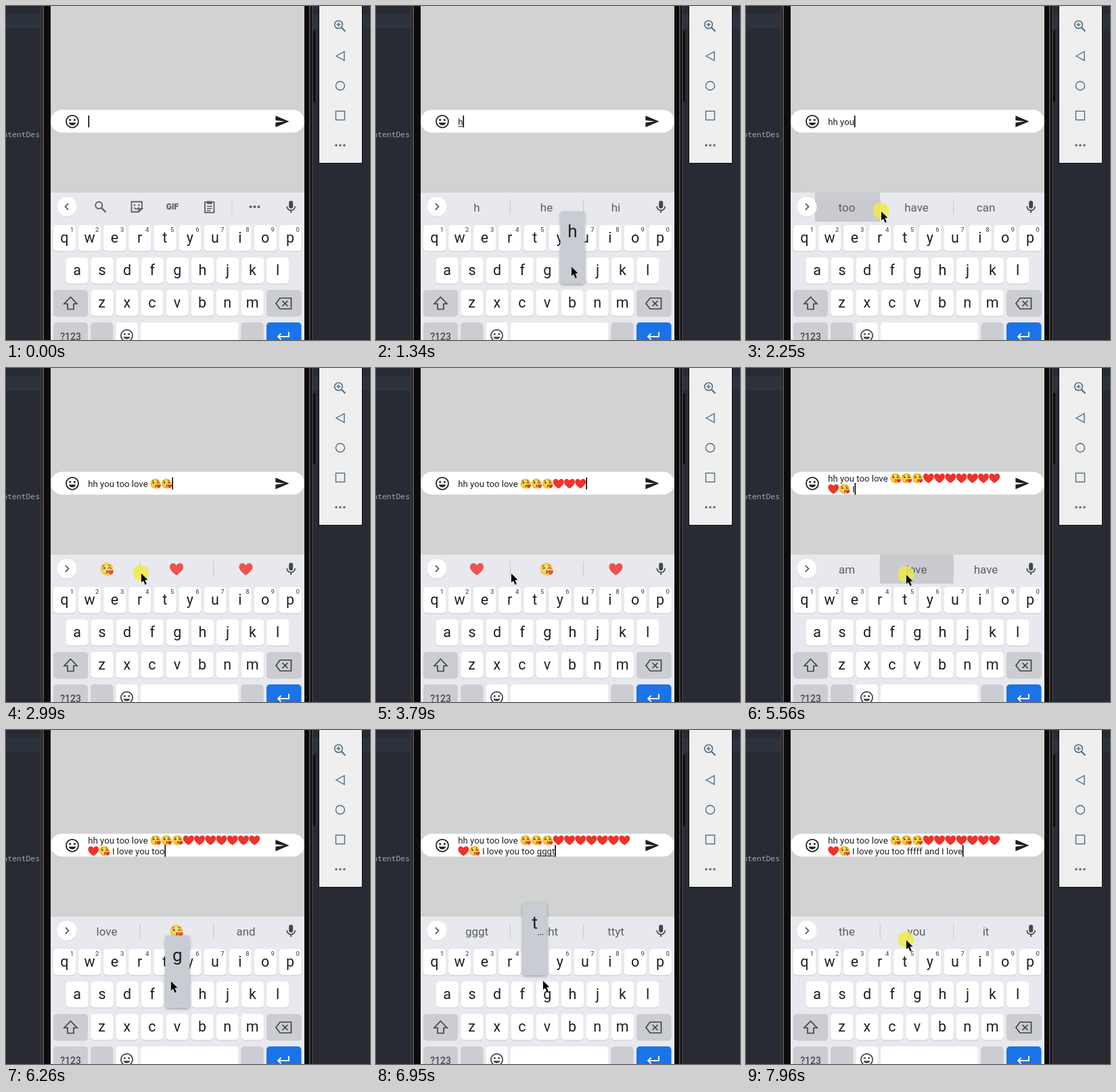
These frames come from a looping animation (538x494 px, 8 s). An HTML page with a canvas:

```html
<!DOCTYPE html>
<html lang="en">
<head>
<meta charset="utf-8">
<title>Emoji keyboard</title>
<style>
html, body { margin: 0; width: 100%; height: 100%; overflow: hidden; background: #282c34; }
canvas { display: block; width: 538px; height: 494px; }
</style>
</head>
<body>
<canvas id="stage" width="538" height="494"></canvas>
<script>
const c = document.getElementById('stage').getContext('2d');
const LOOP = 8000, FONT = 'Roboto, sans-serif';
const INK = '#1f1f1f', GREY = '#5b5e63', KEY = '#fff', DIM = '#cbcdd3', PANEL = '#e8e9ee';

// K = kissing face, H = heart; composing text is underlined and replaced by the next step
const steps = [
  { at: 0, add: '' },
  { at: 1170, add: 'h', key: 'h', composing: true, tips: ['h', 'he', 'hi'] },
  { at: 1370, add: 'hh', key: 'h', composing: true, tips: ['hh', 'hhh', 'hi'] },
  { at: 1460, add: 'hh', tips: ['you', 'I', 'the'] },
  { at: 2010, add: ' you', slot: 0, tips: ['too', 'have', 'can'] },
  { at: 2300, add: ' too', slot: 0, tips: ['love', 'K', 'and'] },
  { at: 2490, add: ' love', slot: 0, tips: ['K', 'you', 'H'] },
  { at: 2710, add: ' K', slot: 0, tips: ['K', 'H', 'H'] },
  { at: 2920, add: 'K', slot: 0, tips: ['K', 'H', 'H'] },
  { at: 3120, add: 'K', slot: 0, tips: ['H', 'K', 'H'] },
  ...[3310, 3490, 3670, 3900, 4110, 4320, 4570].map(at => ({ at, add: 'H', slot: 0, tips: ['H', 'K', 'H'] })),
  { at: 4780, add: '\nH', slot: 0, tips: ['H', 'K', 'H'] },
  { at: 5220, add: 'K', slot: 1, tips: ['H', 'I', 'H'] },
  { at: 5410, add: ' I', slot: 1, tips: ['am', 'love', 'have'] },
  { at: 5580, add: ' love', slot: 1, tips: ['the', 'you', 'it'] },
  { at: 5760, add: ' you', slot: 1, tips: ['K', 'too', 'and'] },
  { at: 5930, add: ' too', slot: 1, tips: ['love', 'K', 'and'] },
  { at: 6310, add: ' g', key: 'g', composing: true, tips: ['g', 'good', 'get'] },
  { at: 6470, add: ' gg', key: 'g', composing: true, tips: ['gg', 'good', 'ggg'] },
  { at: 6630, add: ' ggg', key: 'g', composing: true, tips: ['ggg', 'good', 'gggg'] },
  { at: 6940, add: ' gggt', key: 't', hold: 130, composing: true, tips: ['gggt', 'right', 'ttyt'] },
  { at: 7280, add: ' fffff', slot: 1, tips: ['the', 'and', 'K'] },
  { at: 7480, add: ' and', slot: 1, tips: ['the', 'I', 'you'] },
  { at: 7690, add: ' I', slot: 1, tips: ['am', 'love', 'have'] },
  { at: 7900, add: ' love', slot: 1, tips: ['the', 'you', 'it'] }
];
let typed = '';
for (const s of steps) {
  s.base = typed;
  if (!s.composing) typed += s.add;
}

const mousePath = [
  [240, 461, 475], [480, 403, 467], [700, 355, 425], [1000, 289, 386], [1480, 289, 386],
  [1880, 200, 304], [4960, 200, 304], [5130, 237, 306], [5970, 237, 306], [6130, 244, 372],
  [6680, 244, 372], [6850, 247, 371], [7060, 247, 371], [7220, 237, 311], [8000, 237, 311]
];

const slots = [[102, 96, 149], [198, 108.5, 252], [307, 94, 354.5]];
const rows = [['qwertyuiop', 70, 324], ['asdfghjkl', 88.6, 372], ['zxcvbnm', 125.3, 420]];
const PITCH = 37.08;
const keyAt = {};
for (const [letters, x, y] of rows)
  [...letters].forEach((ch, i) => { keyAt[ch] = { x: x + i * PITCH, y }; });

function rect(x, y, w, h, color) {
  c.fillStyle = color;
  c.fillRect(x, y, w, h);
}
function round(x, y, w, h, r, color) {
  c.beginPath();
  c.roundRect(x, y, w, h, r);
  c.fillStyle = color;
  c.fill();
}
function disc(x, y, r, color) {
  c.beginPath();
  c.arc(x, y, r, 0, 7);
  c.fillStyle = color;
  c.fill();
}
function ring(x, y, r, color, w) {
  c.beginPath();
  c.arc(x, y, r, 0, 7);
  c.strokeStyle = color;
  c.lineWidth = w;
  c.stroke();
}
function line(points, color, w, closed) {
  c.beginPath();
  points.forEach(([x, y]) => c.lineTo(x, y));
  if (closed) c.closePath();
  c.strokeStyle = color;
  c.lineWidth = w;
  c.stroke();
}
function poly(points, color) {
  c.beginPath();
  points.forEach(([x, y]) => c.lineTo(x, y));
  c.fillStyle = color;
  c.fill();
}
function label(str, x, y, font, color, align = 'center') {
  c.font = font + ' ' + FONT;
  c.textAlign = align;
  c.fillStyle = color;
  c.fillText(str, x, y);
}
function dots(x, y, gap, r, color) {
  for (let i = -1; i < 2; i++) disc(x + i * gap, y, r, color);
}

function smiley(x, y, r, color) {
  ring(x, y, r, color, r * 0.2);
  disc(x - r * 0.37, y - r * 0.25, r * 0.17, color);
  disc(x + r * 0.37, y - r * 0.25, r * 0.17, color);
  c.beginPath();
  c.ellipse(x, y + r * 0.2, r * 0.56, r * 0.42, 0, 0, Math.PI);
  c.fill();
}
function heart(x, y, w) {
  c.save();
  c.translate(x, y);
  c.scale(w / 16, w / 16);
  c.beginPath();
  c.moveTo(0, 7.2);
  c.bezierCurveTo(-4, 4.5, -8, 1, -8, -2.6);
  c.bezierCurveTo(-8, -7.6, -2, -8.6, 0, -4.2);
  c.bezierCurveTo(2, -8.6, 8, -7.6, 8, -2.6);
  c.bezierCurveTo(8, 1, 4, 4.5, 0, 7.2);
  c.fillStyle = '#f0322a';
  c.fill();
  c.restore();
}
function kiss(x, y, w) {
  c.save();
  c.translate(x, y);
  c.scale(w / 16, w / 16);
  const g = c.createRadialGradient(0, -1, 2, 0, 0, 8);
  g.addColorStop(0, '#fddc55');
  g.addColorStop(1, '#f6b52f');
  disc(0, 0, 7.6, g);
  const brown = '#5a3a1c';
  c.lineCap = 'round';
  line([[-5, -3.6], [-3.4, -4.6]], brown, 0.9);
  line([[2, -4.6], [4, -4]], brown, 0.9);
  disc(-3, -1.4, 1.3, brown);
  line([[1.8, -1], [3.4, -2], [5, -0.8]], brown, 1.1);
  line([[-0.4, 1.6], [1, 2.4], [0, 3.2], [1, 4], [-0.4, 4.8]], brown, 1);
  c.lineCap = 'butt';
  heart(4.8, 4, 6.4);
  c.restore();
}
const emoji = { K: kiss, H: heart };

function desktop() {
  rect(0, 0, 538, 494, '#282b34');
  rect(0, 12, 538, 21, '#2c333d');
  c.font = '11.4px "Noto Sans Mono", "DejaVu Sans Mono", monospace';
  c.textAlign = 'right';
  c.fillStyle = '#a2abb8';
  c.fillText('ntentDes', 50, 194);
  rect(51, 0, 15, 494, '#0c0b0c');
  rect(51, 0, 2, 494, '#3b3a3e');
  rect(54, 0, 2, 494, '#5a5352');
  rect(441, 0, 13, 494, '#0c0b0c');
  rect(448, 0, 2, 494, '#4f4948');
  rect(452, 0, 2, 494, '#3b3a3e');
  rect(454, 37, 3, 105, '#0c0c0e');
  rect(462, 0, 65, 233, '#0d0d10');
  rect(463, 0, 63, 232, '#efefef');

  const slate = '#516d80';
  ring(491.5, 27.5, 5.8, slate, 1.6);
  line([[488.5, 27.5], [494.5, 27.5]], slate, 1.5);
  line([[491.5, 24.5], [491.5, 30.5]], slate, 1.5);
  line([[496, 32], [501.5, 37.5]], slate, 2.2);
  line([[488, 74], [500, 67.5], [500, 80.5]], slate, 1.4, true);
  ring(494, 118, 6.5, slate, 1.4);
  c.strokeRect(487.5, 155.5, 13, 13);
  dots(494, 206, 6, 1.8, slate);
}

function drawKey(x, y, w, color) {
  round(x, y + 1, w, 38.5, 5, '#c6c8ce');
  round(x, y, w, 38.5, 5, color);
}

function keyboard() {
  rect(66, 276, 375, 218, PANEL);
  for (const [letters, x0, y] of rows) {
    [...letters].forEach((ch, i) => {
      const x = x0 + i * PITCH;
      drawKey(x, y, 33, KEY);
      label(ch, x + 16.4, y + 26, '21.5px', INK);
      if (y === 324) label((i + 1) % 10, x + 27.5, y + 10, '500 9.5px', GREY);
    });
  }
  drawKey(70, 420, 51, DIM);
  drawKey(385, 420, 51.5, DIM);
  drawKey(70, 468, 51, DIM);
  drawKey(125.3, 468, 33, DIM);
  drawKey(162.4, 468, 32.5, KEY);
  drawKey(199, 468, 144.5, KEY);
  drawKey(347.5, 468, 33, DIM);
  drawKey(385, 468, 51.5, '#1a73e8');

  const dark = '#3f4246';
  line([[95.5, 430.5], [105, 440.5], [100, 440.5], [100, 448.5], [91, 448.5], [91, 440.5], [86, 440.5]], dark, 1.7, true);
  line([[399, 440], [405, 432], [421.5, 432], [421.5, 448], [405, 448]], dark, 1.7, true);
  line([[408.5, 436], [416.5, 444]], dark, 1.7);
  line([[416.5, 436], [408.5, 444]], dark, 1.7);
  label('?123', 95.5, 493.5, '500 14px', '#45484d');
  smiley(178.5, 487.5, 8.6, dark);
  line([[418, 482], [418, 489], [402, 489]], '#fff', 1.8);
  line([[406.5, 484.5], [402, 489], [406.5, 493.5]], '#fff', 1.8);
}

function mic() {
  const dark = '#44474b';
  round(418.2, 288, 6, 11.5, 3, dark);
  c.beginPath();
  c.arc(421.2, 296.3, 6, 0, Math.PI);
  c.strokeStyle = dark;
  c.lineWidth = 1.7;
  c.stroke();
  line([[421.2, 302], [421.2, 306]], dark, 1.8);
}

function chevron(dir) {
  disc(90, 297.6, 14.6, '#d4d6da');
  disc(90, 296.8, 14.5, '#fff');
  line([[90 - 2.2 * dir, 292], [90 + 2.5 * dir, 296.8], [90 - 2.2 * dir, 301.6]], '#505357', 1.7);
}

function tools() {
  chevron(-1);
  ring(137.3, 294.8, 5, GREY, 1.9);
  line([[141, 298.5], [147.5, 305]], GREY, 2.3);
  line([[201, 300], [201, 289.5], [185.5, 289.5], [185.5, 304.5], [196, 304.5], [201, 300], [196.5, 300], [196, 304.5]], GREY, 1.8);
  disc(190, 294.5, 1.3, GREY);
  disc(196.5, 294.5, 1.3, GREY);
  c.beginPath();
  c.arc(193, 296.8, 3.6, 0.2, 2.9);
  c.stroke();
  label('GIF', 246, 300.8, '900 12px', GREY);
  c.strokeStyle = GREY;
  c.lineWidth = 1.8;
  c.strokeRect(294, 290, 13.5, 15.5);
  rect(297, 288.5, 7.5, 4.5, GREY);
  for (const y of [295.5, 298.8, 302]) rect(297, y, y > 300 ? 5 : 7.5, 1.5, GREY);
  rect(333.5, 286, 1, 22, '#cdcfd4');
  dots(367.5, 297, 6, 2, GREY);
}

function tips(step, next, t) {
  if (next && next.slot !== undefined && t > next.at - 90) {
    const [x, w] = slots[next.slot];
    rect(x, 276, w, 43, '#cacbd1');
  }
  chevron(1);
  rect(197.7, 286, 1, 22, '#c3c5ca');
  rect(306.3, 286, 1, 22, '#c3c5ca');
  step.tips.forEach((tip, i) => {
    const x = slots[i][2];
    if (emoji[tip]) {
      c.globalAlpha = 0.82;
      emoji[tip](x, 297.5, 20);
      c.globalAlpha = 1;
    } else label(tip, x, 303.5, '17px', GREY);
  });
}

function message(step, t) {
  round(66, 153.5, 375, 33.7, 16.8, '#fff');
  smiley(98, 170.8, 9, INK);
  poly([[398.4, 162.3], [418.5, 170.8], [398.4, 179.3], [398.4, 172.6], [412, 170.8], [398.4, 169]], INK);

  const str = step.base + step.add;
  const start = step.base.length + (step.add[0] === ' ' ? 1 : 0);
  let x = 121.2, y = str.includes('\n') ? 168 : 176, mark = x, run = '';
  c.font = '13.2px ' + FONT;
  c.textAlign = 'left';
  const flush = () => {
    c.fillStyle = INK;
    c.fillText(run, x, y);
    x += c.measureText(run).width;
    run = '';
  };
  [...str].forEach((ch, i) => {
    if (i === start) { flush(); mark = x; }
    if (ch === '\n') { flush(); x = 121.2; y += 16; }
    else if (emoji[ch]) { flush(); emoji[ch](x + 8.1, y - 5, 16); x += 16.25; }
    else run += ch;
  });
  flush();
  if (step.composing) rect(mark, y + 1.7, x - mark, 1, INK);
  if ((t - step.at) % 1000 < 500) rect(x + (str ? 0 : 0.3), y - 14, 1.6, 17.5, '#000');
}

function popup(t) {
  const s = steps.find(s => s.key && t > s.at - 65 && t < s.at + (s.hold || 60));
  if (!s) return;
  const { x, y } = keyAt[s.key];
  c.save();
  c.shadowColor = 'rgba(0,0,0,.3)';
  c.shadowBlur = 4;
  c.shadowOffsetY = 1.5;
  round(x - 1.5, y - 68, 36, 107, 4, '#c9ccd3');
  c.restore();
  label(s.key, x + 16.4, y - 30.5, '26px', INK);
  if (s.key === 't') dots(x + 25, y - 21.5, 3, 0.8, INK);
}

function mouse(t) {
  if (t < mousePath[0][0]) return;
  const i = Math.max(1, mousePath.findIndex(p => p[0] > t));
  const [t0, x0, y0] = mousePath[i - 1], [t1, x1, y1] = mousePath[i];
  const u = (t - t0) / (t1 - t0), e = u * u * (3 - 2 * u);
  const x = x0 + (x1 - x0) * e, y = y0 + (y1 - y0) * e;
  if (steps.some(s => (s.slot !== undefined || s.key) && t > s.at - 90 && t < s.at + (s.slot === undefined ? -70 : 100)))
    disc(x - 0.5, y - 1, 12, 'rgba(240,236,70,.82)');
  const arrow = [[0, 0], [0, 13.2], [3, 10.5], [5.6, 16.4], [7.8, 15.4], [5.3, 9.6], [9.4, 9.3]];
  poly(arrow.map(([dx, dy]) => [x + dx, y + dy]), '#000');
}

function draw(t) {
  let n = steps.findIndex(s => s.at > t);
  if (n < 0) n = steps.length;
  const step = steps[n - 1], next = steps[n];
  desktop();
  rect(66, 0, 375, 276, '#d1d3d2');
  message(step, t);
  keyboard();
  if (step.tips) tips(step, next, t);
  else tools();
  mic();
  popup(t);
  mouse(t);
}

const begin = performance.now();
function tick() {
  draw((performance.now() - begin) % LOOP);
  requestAnimationFrame(tick);
}
tick();
</script>
</body>
</html>
```
